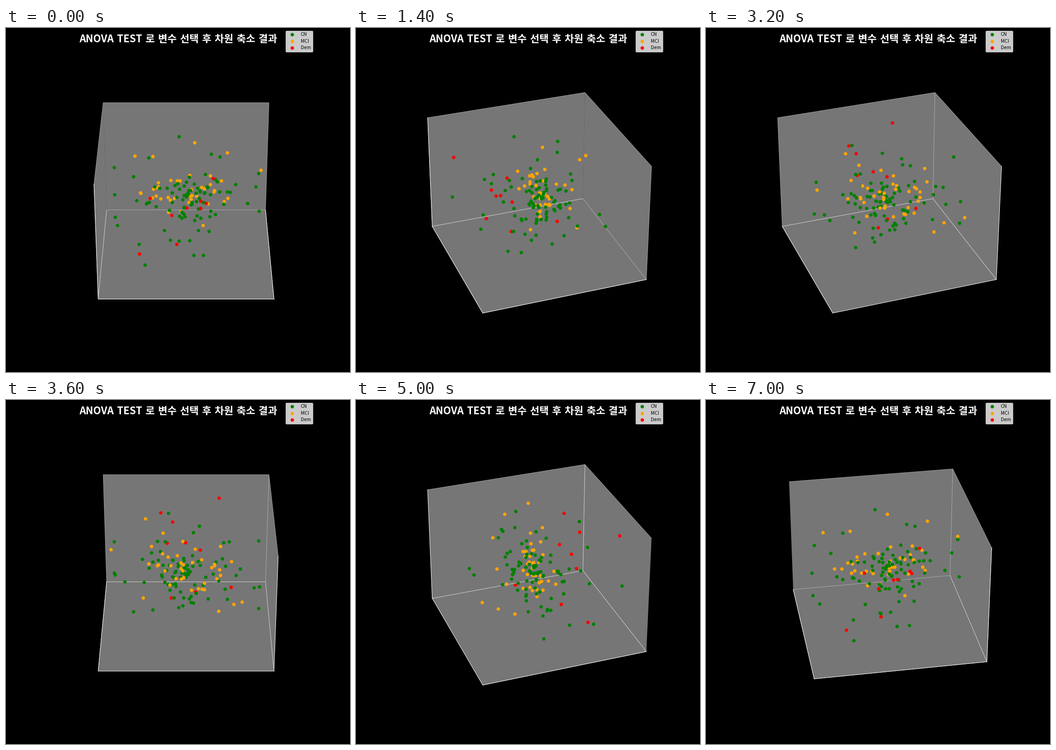
Animation of 748x748 px, one loop 7200 ms. Source, as a matplotlib script:

```python
import numpy as np
import matplotlib.pyplot as plt
from matplotlib.animation import FuncAnimation

SIZE, DPI = 748, 68
PX = 72 / DPI  # points per pixel
FRAMES, INTERVAL = 36, 200
HALF = np.array([185.3, 185.3, 139])  # half box, in pixels at the centre depth

plt.rcParams["font.family"] = ["Noto Sans CJK JP", "DejaVu Sans"]
plt.rcParams["axes.linewidth"] = PX
plt.rcParams["patch.linewidth"] = PX

rng = np.random.default_rng(12)


def cloud(count, mean, spread, outliers):
    """Outliers plus a dense core whose tails stay inside the box."""
    reach = rng.uniform(0.3, 1.5, size=(count, 1))
    core = mean + reach * rng.normal(size=(count, 3)) * spread
    return np.vstack([outliers, np.clip(core, -0.85 * HALF, 0.85 * HALF)])


groups = {
    "CN": ("green", cloud(
        83, (-8, 0, -3), (42, 64, 38),
        [(-54, -15, 122), (-3, -155, 74), (161, -98, -18),
         (41, 17, -121), (-118, 111, -33)])),
    "MCI": ("orange", cloud(
        37, (-3, -8, 5), (40, 68, 33),
        [(-92, 19, 88), (13, 87, 119), (-161, -116, 17), (-16, 161, 60)])),
    "Dem": ("red", cloud(
        3, (85, -20, 15), (25, 35, 20),
        [(85, 56, 96), (162, -74, 93), (112, 30, 58),
         (-37, 32, -48), (51, -21, -86), (82, -101, -92)])),
}

fig = plt.figure(figsize=(SIZE / DPI, SIZE / DPI), dpi=DPI, facecolor="black")
ax = fig.add_subplot(projection="3d", facecolor="black")
grow = 748.8 / SIZE
fig.subplots_adjust(left=0.125 * grow, right=0.9 * grow,
                    bottom=0.11 * grow, top=0.88 * grow)

for name, (color, points) in groups.items():
    ax.scatter(*points.T, s=(6 * PX) ** 2, linewidth=1.5 * PX, color=color,
               alpha=1, depthshade=False, label=name)

for axis, half in zip("xyz", HALF):
    ax.set(**{f"{axis}lim": (-half, half), f"{axis}ticks": []})
for axis in (ax.xaxis, ax.yaxis, ax.zaxis):
    axis.line.set_color("white")
    axis.set_pane_color((0.925, 0.925, 0.925, 0.5))

# Third-of-an-em spaces set the words apart
title = "ANOVA TEST 로 변수 선택 후 차원 축소 결과".replace(" ", "\u2004")
fig.text(0.5, 1 - 31 / SIZE, title, color="white", fontsize=22 * PX,
         weight="bold", ha="center", va="baseline")
legend = fig.legend(loc="upper left", fontsize=10.3 * PX, borderaxespad=0,
                    labelspacing=0.45, borderpad=0.36, scatteryoffsets=[0.45],
                    bbox_to_anchor=(608 / SIZE, 1 - 5.5 / SIZE))
legend.get_frame().set_linewidth(PX)


def update(frame):
    ax.view_init(elev=30, azim=frame * 360 / FRAMES)
    return []


anim = FuncAnimation(fig, update, frames=FRAMES, interval=INTERVAL,
                     repeat=True, repeat_delay=0, blit=False)
plt.show()
```
